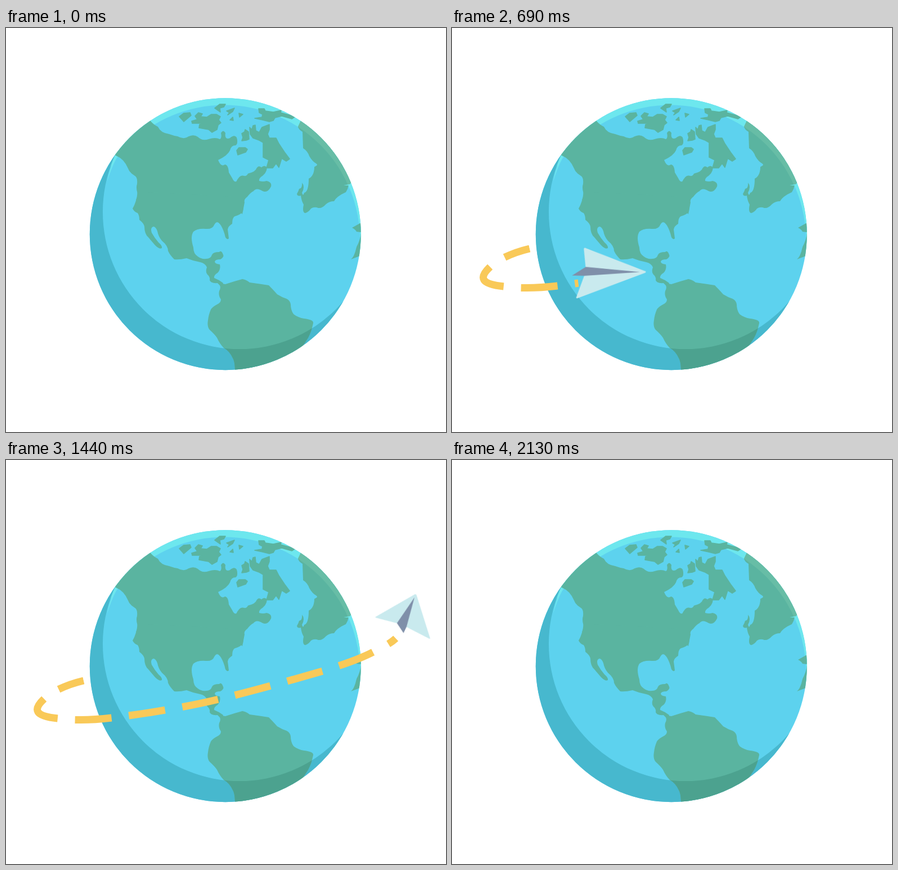
Animation of 782 by 716 pixels, one loop 2280 ms. Source, as an HTML page without scripts:

```html
<!DOCTYPE html>
<html lang="en">
<head>
<meta charset="utf-8">
<title>Paper plane around the globe</title>
<style>
html, body { margin: 0; width: 100%; height: 100%; overflow: hidden; background: #fff; }
svg { display: block; width: 100%; height: 100%; }

.land { fill: #5ab4a0; }
.isles { stroke: #5ab4a0; stroke-width: 1.6; stroke-linejoin: round; }
.wing { fill: #c9eaee; stroke: #c9eaee; stroke-width: 3; stroke-linejoin: round; }
.keel { fill: #7f8fa9; }

/* the dashes stay put; a solid stroke in the mask draws and wipes them */
.trail, .reveal { fill: none; stroke-width: 13; }
.trail { stroke: #f9c958; stroke-dasharray: 65 31; stroke-dashoffset: 18; }
.reveal { stroke: #fff; stroke-width: 18; stroke-dasharray: 882 2000; animation: draw 2.28s linear infinite; }
@keyframes draw {
  0%, 11.7% { stroke-dashoffset: 883; }
  70.96% { stroke-dashoffset: 0; }
  93.2%, 100% { stroke-dashoffset: -883; }
}

.behind, .front { animation: fly 2.28s linear infinite, behind 2.28s step-end infinite; }
.front { animation-name: fly, front; }
@keyframes behind {
  0%, 63.6% { visibility: visible; }
  12.5%, 78% { visibility: hidden; }
}
@keyframes front {
  0%, 63.6% { visibility: hidden; }
  12.5% { visibility: visible; }
}
/* key poses: tail position, heading, lean, foreshortening */
@keyframes fly {
  0% { transform: translate(268px, 380px) rotate(176deg) skewX(-23deg) scale(.9, .8); }
  6.58% { transform: translate(150px, 378px) rotate(155deg) skewX(-18deg) scale(.85, .85); }
  10.96% { transform: translate(88px, 395px) rotate(108deg) skewX(-14deg) scale(.72, .9); }
  14.47% { transform: translate(70.500px, 423px) rotate(50.500deg) skewX(-14deg) scale(.72, .97); }
  23.68% { transform: translate(156px, 441px) rotate(3deg) skewX(-12deg) scale(1, .98); }
  30.26% { transform: translate(227.500px, 434.500px) rotate(-1deg) skewX(-10deg) scale(1, .98); }
  42.11% { transform: translate(364px, 420.500px) rotate(-8deg) skewX(6deg) scale(.98, 1.04); }
  55.26% { transform: translate(593px, 380.500px) rotate(-48deg) skewX(9deg) scale(.8, 1.18); }
  63.16% { transform: translate(705px, 298px) rotate(-68deg) skewX(0deg) scale(.55, 1.15); }
  67.11% { transform: translate(698px, 280px) rotate(-136deg) skewX(-12deg) scale(.55, 1); }
  71.05% { transform: translate(638px, 267px) rotate(-183.500deg) skewX(-23deg) scale(.84, .8); }
  76.3%, 100% { transform: translate(520px, 285px) rotate(-187deg) skewX(-23deg) scale(.84, .8); }
}
</style>
</head>
<body>
<svg viewBox="0 0 782 716">
<defs>
  <circle id="disc" cx="389.800" cy="365.200" r="241"/>
  <clipPath id="globe"><use href="#disc"/></clipPath>

  <path id="south" d="M376 452L378 447Q382 454 390 454Q405 449 420 445Q427 446 433 451Q455 454 467 456Q475 464 482 472Q490 477 499 480Q505 483 506 490Q506 500 511 507Q518 513 530 515Q547 517 546 523Q543 538 537 549L520 575L470 625H407Q408 592 403 585Q397 572 387 567Q380 560 375 549Q371 543 362 535Q357 529 359 518Q360 508 364 499Q367 494 375 490Q382 487 382 481Q377 474 379 466Q384 457 376 452Z"/>
  <clipPath id="southClip"><use href="#south"/></clipPath>

  <path id="northeast" d="M526 160L519 175Q520 180 527 184L528 213Q536 218 539 227Q544 236 551 240Q556 243 548 246Q548 262 538 267Q538 290 530 292Q528 299 526 292Q532 281 526 274Q527 284 521 285Q520 289 517 294Q518 299 524 297Q525 306 529 313Q526 327 532 328Q538 326 542 320Q548 316 555 319Q562 320 569 312Q575 307 583 307Q588 298 604 291Q608 285 609 278L625 265L590 160Z"/>
  <clipPath id="northeastClip"><use href="#northeast"/></clipPath>

  <!-- rings: everything outside a shifted disc -->
  <path id="shade" fill-rule="evenodd" d="M0 0H782V716H0ZM172 326a243 243 0 1 0 486 0a243 243 0 1 0-486 0Z"/>
  <path id="shine" fill-rule="evenodd" d="M0 0H782V716H0ZM146.500 378a241.500 241.500 0 1 0 483 0a241.500 241.500 0 1 0-483 0Z"/>

  <path id="orbit" pathLength="882" d="M138 391C108 398 80 411 67 424C47 443 52 454 92 458C122 462 154 461 188 457C252 449 320 438 378 424C440 409 504 391 563 374C604 361 630 352 653 340C673 330 690 322 699 309C711 292 703 284 686 283C666 281 645 283 620 286"/>
  <mask id="drawn" maskUnits="userSpaceOnUse" x="0" y="0" width="782" height="716">
    <use href="#orbit" class="reveal"/>
  </mask>

  <!-- nose points right, origin midway between the wing tips -->
  <g id="plane">
    <path class="wing" d="M115 0L1-44L9-12ZM115 0L1 44L9 6Z"/>
    <path class="keel" d="M106 0L8-11L-14 4L8 5Z"/>
  </g>
</defs>

<use href="#plane" class="behind"/>

<use href="#disc" fill="#5dd2ee"/>
<g clip-path="url(#globe)">
  <use href="#shine" fill="#6de7ee"/>
  <use href="#shade" fill="#47b8ce"/>
  <path fill="#6de7ee" d="M195 227Q184 248 180 272Q188 245 198 228Z"/>
  <g class="land">
    <!-- Arctic coast and west -->
    <path d="M250 155L257 165Q262 171 270 175Q275 186 290 188Q298 191 305 192Q314 197 321 194Q333 187 341 193Q349 201 360 197Q372 193 380 197Q384 195 382 186Q386 179 390 186Q388 199 398 195Q406 188 410 194Q413 205 408 208Q400 208 398 217Q394 226 377 234Q382 247 389 242Q395 242 396 256L402 266Q407 277 412 269L418 305H231Q235 299 233 290Q231 283 233 276Q234 265 229 262Q220 257 217 249Q210 232 195 226L180 215Z"/>
    <!-- east coast -->
    <path d="M400 310L409 273Q415 259 423 262Q428 263 430 258Q440 256 444 251Q448 242 454 247Q459 242 464 247Q463 257 456 262Q449 266 450 271Q457 273 463 271Q473 273 471 281Q465 293 456 289Q445 282 440 289Q434 292 429 299Q422 304 424 309L420 330Z"/>
    <!-- gulf and isthmus -->
    <path d="M234 290Q232 308 225 320Q227 325 234 328Q237 332 237 340Q245 346 246 352Q246 365 253 371Q260 379 265 385Q273 393 277 390Q278 386 271 380Q264 372 259 363Q256 354 262 352Q266 352 269 360Q271 370 277 377Q288 386 288 395Q291 402 299 410Q308 411 321 408Q333 413 345 415Q354 417 357 424Q354 433 358 437Q363 441 362 447Q364 453 376 452L383 459L386 452Q378 446 370 443Q369 438 376 434Q382 428 380 419Q371 418 371 414Q372 410 381 410Q388 406 386 402Q383 393 379 397Q368 397 366 402Q364 409 356 409Q347 410 341 405Q333 400 333 389Q327 370 333 361Q340 355 355 356Q367 357 370 349Q375 339 382 350Q387 358 390 371Q393 376 396 373L394 357Q395 351 402 347Q402 337 406 334Q419 330 421 325L424 300Z"/>
    <use href="#south"/>
    <use href="#northeast"/>
    <path d="M640 340L615 354Q621 357 623 361L631 362Q630 375 623 388Q619 406 613 410L645 398Z"/>
    <g class="isles">
      <path d="M308 157L316 151L327 150L329 155L316 166ZM342 150L349 152L346 157L357 158L365 153L374 153L381 157L378 163L382 168L377 172L375 180L366 185L360 180L343 177L344 171L354 169L331 169L330 165L340 162L336 156Z"/>
      <path d="M371 142L380 135L390 135L387 140L380 142L381 149ZM392 147L406 142L403 148L394 154L397 150ZM398 163L403 158L404 164ZM414 151L421 153L415 158ZM419 187L424 184L425 180L431 184L432 197L427 199L419 200L421 194ZM410 217L414 212L425 212L429 215L426 220L412 225Z"/>
      <path d="M449 143L459 143L461 147L475 149L489 146L488 150L514 157L508 161L490 156L478 159L475 164L468 166L456 163L442 160L455 158L456 153L450 150Z"/>
      <path d="M433 176L437 180L439 173L443 172L444 182L450 185L455 176L468 171L468 180L465 188L468 195L480 195L485 205L495 220L504 232L498 236L490 231L485 247L480 240L474 248L463 248L467 234L457 229L457 203L450 199L439 195L434 188Z"/>
    </g>
  </g>
  <use href="#shade" fill="#4ca28f" clip-path="url(#southClip)"/>
  <use href="#shine" fill="#67bda6" clip-path="url(#northeastClip)"/>
  <path fill="#6de7ee" d="M600 279L610 277V279Z"/>
</g>

<g mask="url(#drawn)"><use href="#orbit" class="trail"/></g>

<use href="#plane" class="front"/>
</svg>
</body>
</html>
```
